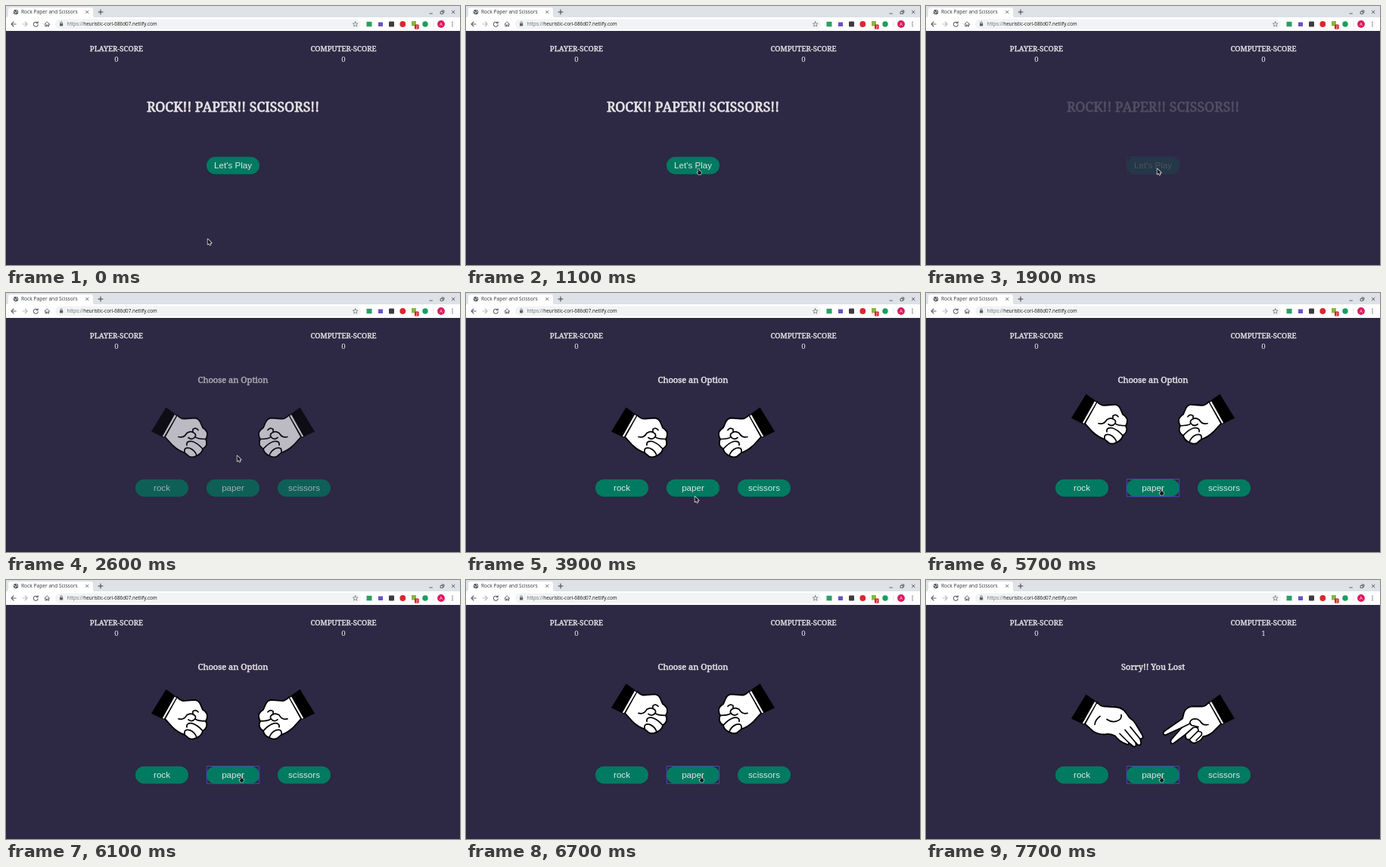
Animation of 600 by 343 pixels, one loop 8000 ms. Source, as an HTML page with a canvas:

```html
<!DOCTYPE html>
<html lang="en">
<head>
<meta charset="utf-8">
<title>Rock Paper and Scissors</title>
<style>
html, body { margin: 0; width: 100%; height: 100%; overflow: hidden; background: #2d2843; }
canvas { display: block; width: 600px; height: 343px; }
</style>
</head>
<body>
<canvas id="stage" width="600" height="343"></canvas>
<script>
const screen2d = document.getElementById('stage').getContext('2d');
const layer = document.createElement('canvas');
layer.width = 600;
layer.height = 343;
const layer2d = layer.getContext('2d');
let ctx = screen2d;

const LOOP = 8000;
const BG = '#2d2843', TEAL = '#007a61', INK = '#e4e2e5', GREY = '#5f6368';
const SERIF = '"Noto Serif", serif';
const SANS = '"Noto Sans", sans-serif';
const ARIAL = '"Liberation Sans", Arial, sans-serif';

const clamp = v => Math.max(0, Math.min(1, v));
const progress = (t, start, length) => clamp((t - start) / length);

// CSS "ease": cubic-bezier(.25, .1, .25, 1)
function ease(x) {
  if (x <= 0 || x >= 1) return clamp(x);
  const curve = (a, b, s) => 3 * a * s * (1 - s) ** 2 + 3 * b * s * s * (1 - s) + s ** 3;
  let lo = 0, hi = 1;
  for (let i = 0; i < 24; i++) {
    const mid = (lo + hi) / 2;
    if (curve(.25, .25, mid) < x) lo = mid; else hi = mid;
  }
  return curve(.1, 1, lo);
}

// Paints a group on its own layer, then blends it in as one.
function fade(opacity, paint) {
  if (opacity <= 0) return;
  layer2d.clearRect(0, 0, 600, 343);
  ctx = layer2d;
  paint();
  ctx = screen2d;
  ctx.globalAlpha = opacity;
  ctx.drawImage(layer, 0, 0);
  ctx.globalAlpha = 1;
}

function text(str, x, y, font, color = INK, align = 'center', weight = 0) {
  ctx.font = font;
  ctx.textAlign = align;
  ctx.fillStyle = color;
  ctx.fillText(str, x, y);
  if (weight) {
    ctx.strokeStyle = color;
    ctx.lineWidth = weight;
    ctx.lineJoin = 'round';
    ctx.strokeText(str, x, y);
  }
}

function pill(x, y, w, h, r, color) {
  ctx.fillStyle = color;
  ctx.beginPath();
  ctx.roundRect(x, y, w, h, r);
  ctx.fill();
}

function dot(x, y, r, color) {
  ctx.fillStyle = color;
  ctx.beginPath();
  ctx.arc(x, y, r, 0, 7);
  ctx.fill();
}

function line(d, color, width = 1) {
  ctx.strokeStyle = color;
  ctx.lineWidth = width;
  ctx.lineJoin = ctx.lineCap = 'round';
  ctx.stroke(new Path2D(d));
}

function shape(d, color) {
  ctx.fillStyle = color;
  ctx.fill(new Path2D(d));
}

// ---- browser frame ----
function browser() {
  pill(0, 0, 600, 16, 0, '#dee1e6');
  pill(0, 15, 600, 18, 0, '#fff');
  shape('M0 15.5 Q3 15 3 12 V5 Q3 2 6 2 H112 Q115 2 115 5 V12 Q115 15 118 15.5 Z', '#fff');

  dot(13, 8, 3.2, '#4d5156');
  line('M10.7 7 L12.5 8 L12 10 M13.5 5.5 L15 7.2 L14 9', '#fff', .9);
  text('Rock Paper and Scissors', 20, 10.3, '6.6px ' + SANS, '#3c4043', 'left');
  line('M105.6 6.2 l3.4 3.4 M109 6.2 l-3.4 3.4', GREY, .9);
  line('M122 8 h6 M125 5 v6', '#3c4043', 1);
  line('M560 10 h3.4 M574.5 7.4 h3 v3 h-3 z M575.8 6 h3 v3 M589.4 6.2 l3.6 3.6 M593 6.2 l-3.6 3.6', '#3c4043', .8);

  line('M13.2 24 H7.2 M10 21 L7 24 L10 27', GREY, 1.1);
  line('M22 24 H28 M25.2 21 L28.2 24 L25.2 27', '#babcbe', 1.1);
  line('M41.7 22.4 A3 3 0 1 0 42.3 24.8 M42.2 20.8 V22.8 H40', GREY, 1.1);
  line('M51 24.2 L54.3 21 L57.6 24.2 M52 23.6 V27 H53.6 V25 H55 V27 H56.6 V23.6', GREY, 1);

  pill(65, 17.5, 404, 13, 6.5, '#f1f3f4');
  pill(71, 23, 4.2, 3.6, .6, GREY);
  line('M71.9 23 V22 A1.2 1.2 0 0 1 74.3 22 V23', GREY, .8);
  const url = '6.35px ' + SANS;
  text('https://', 80.5, 26.2, url, '#70757a', 'left');
  const host = 80.5 + ctx.measureText('https://').width;
  text('heuristic-cori-686d07.netlify.com', host, 26.2, url, '#202124', 'left');

  let star = '';
  for (let i = 0; i < 10; i++) {
    const a = i * Math.PI / 5 - Math.PI / 2, r = i % 2 ? 1.6 : 3.5;
    star += (i ? 'L' : 'M') + (461.7 + r * Math.cos(a)) + ' ' + (24.2 + r * Math.sin(a));
  }
  line(star + 'Z', GREY, .7);

  pill(476.5, 20.8, 7, 6.5, 0, '#2b9f63');
  pill(492, 21.5, 6, 5.5, 0, '#6a4fc4');
  pill(506, 20.6, 7, 7, 1, '#3c3c40');
  dot(524.3, 24, 3.9, '#dc2530');
  pill(536, 20, 6, 6.5, 0, '#87b83f');
  pill(540, 24.5, 5.6, 6.2, 1, '#d5202a');
  text('2', 542.8, 29.6, '5px ' + ARIAL, '#fff');
  dot(554, 24, 3.7, '#16a05c');
  line('M565 20.5 V27.5', '#d5d7da', .7);
  dot(575, 24, 4.9, '#e0195f');
  text('A', 575, 25.9, '5.3px ' + ARIAL, '#fff');
  for (const y of [21.5, 24, 26.5]) dot(590, y, .8, GREY);
}

// ---- page parts ----
function scores(computer) {
  const label = '9.7px ' + SERIF, digit = '9.7px ' + SERIF;
  text('PLAYER-SCORE', 146, 59.8, label, INK, 'center', .4);
  text('COMPUTER-SCORE', 446, 59.8, label, INK, 'center', .4);
  text('0', 146, 74.3, digit);
  text(computer, 446, 74.3, digit);
}

function button(label, x, y, focused) {
  pill(x, y, 70, 23, 11.5, TEAL);
  text(label, x + 35, y + 15.4, '11.6px ' + ARIAL, '#dfe5e4');
  if (focused) {
    ctx.strokeStyle = '#4549b4';
    ctx.lineWidth = 1;
    ctx.strokeRect(x + .3, y - .2, 69.4, 23.2);
  }
}

// Each pose is a left-hand outline plus inner creases.
const POSES = {
  rock: [
    'M226 161 Q231 167 237 166 L250 165 Q255 166 257 171 L260 178 Q266 182 266 186 Q266 190 264 193 Q268 201 260 206 Q259 212 252 215 Q247 218 242 216 L236 211 Q227 208 220 201 L210 190 Z',
    'M228 190 Q235 192 239 185 Q244 182 247 184 L247 180 Q251 177 254 181 M247 184 Q252 186 250 190 Q253 193 264 193 M250 190 Q246 195 241 191 M260 206 Q253 198 246 196 Q238 195 239 201 M252 215 Q250 208 243 205 Q235 203 236 210'
  ],
  paper: [
    'M226 161 Q231 168 238 167 L252 168 Q260 169 264 175 L269 182 Q274 185 277 190 L286 205 Q288 210 283 210 L284 214 Q285 219 280 218 L277 215 Q279 221 274 220 L268 215 Q268 219 263 216 Q255 213 250 206 Q243 202 236 204 Q228 204 221 200 L210 190 Z',
    'M283 210 L270 194 M278 216 L263 198 M268 215 L256 203 M223 191 Q224 184 230 180 M239 184 Q246 189 253 186 Q259 184 258 178'
  ],
  scissors: [
    'M226 161 Q231 168 237 167 L249 167 Q257 169 259 175 L261 183 L284 199 Q289 203 284 205 L262 195 L276 211 Q278 217 273 216 L257 204 Q258 211 252 211 Q247 218 242 214 Q236 212 234 207 Q227 206 221 201 L210 190 Z',
    'M227 191 Q234 193 238 186 Q242 182 248 184 Q254 188 249 192 L240 194 M262 195 L252 190 M257 204 L247 195 Q240 193 240 199 L252 211 M240 200 Q234 200 236 205 L243 212'
  ]
};

function hand(pose, lift, mirrored) {
  const [outline, creases] = POSES[pose];
  ctx.save();
  if (mirrored) ctx.transform(-1, 0, 0, 1, 600, 0);
  ctx.translate(0, .5 - lift);
  shape(outline, '#fff');
  line(outline, '#000', 1.8);
  line(creases, '#000', 1.7);
  const band = 'M222.5 160 L225.5 162 L209 190.5 L206 189.5 Z';
  shape(band, '#fff');
  line(band, '#000', 1);
  shape('M211.5 151 L223.5 159.5 L206.5 190 L192 183 Z', '#000');
  ctx.restore();
}

function intro(t) {
  fade(1 - ease(progress(t, 1650, 500)), () => {
    text('ROCK!! PAPER!! SCISSORS!!', 300, 140, '17.7px ' + SERIF, INK, 'center', .8);
    button("Let's Play", 265, 199.7, t >= 1500);
  });
}

// Four shakes, eased between the low and high ends.
const BEATS = [0, .15, .25, .35, .47, .62, .765, .86, 1];
function shake(t) {
  const p = progress(t, 5100, 2000);
  if (p <= 0 || p >= 1) return 0;
  const i = BEATS.findIndex(b => b > p) - 1;
  const e = ease((p - BEATS[i]) / (BEATS[i + 1] - BEATS[i]));
  return 22 * (i % 2 ? 1 - e : e);
}

function match(t) {
  const heading = t < 7200 ? 'Choose an Option' : 'Sorry!! You Lost';
  const lift = shake(t);
  fade(ease(progress(t, 2200, 1000)), () => {
    text(heading, 300, 118.8, '11.1px ' + SERIF, INK, 'center', .5);
    hand(t < 7600 ? 'rock' : 'paper', lift, false);
    hand(t < 7700 ? 'rock' : 'scissors', lift, true);
    button('rock', 171, 246.7);
    button('paper', 265, 246.7, t >= 5000);
    button('scissors', 359, 246.7);
  });
}

// ---- pointer: [time, x, y] ----
const TRACK = [
  [400, 266, 308], [600, 272, 289], [800, 288, 246], [1000, 302, 219], [1100, 305, 215],
  [3100, 305, 215], [3300, 262, 188], [3400, 241, 178], [3500, 306, 167], [3600, 374, 190],
  [3700, 362, 232], [3800, 322, 262], [3900, 302, 269],
  [4400, 302, 269], [4700, 308, 259.5]
];

function pointer(t) {
  let i = TRACK.findIndex(k => k[0] > t);
  if (i < 0) i = TRACK.length;
  const a = TRACK[Math.max(0, i - 1)], b = TRACK[Math.min(i, TRACK.length - 1)];
  const p = b[0] > a[0] ? progress(t, a[0], b[0] - a[0]) : 0;
  const x = a[1] + (b[1] - a[1]) * p, y = a[2] + (b[2] - a[2]) * p;
  const overButton = (t >= 1000 && t < 1700) || t >= 4500;
  const form = overButton
    ? 'M2 .4 Q3 0 3.2 1 V3.3 L5.6 4 Q6.2 4.5 6 6 L5.4 8.2 H2.2 L.4 5.6 Q.3 4.6 1.6 5.4 V1 Z'
    : 'M.5 .5 V7.8 L2.2 6.3 L3.4 8.8 L4.6 8.2 L3.5 5.8 H5.8 Z';
  ctx.save();
  ctx.translate(x, y);
  line(form, '#f2f2f2', overButton ? 1.1 : 1.4);
  shape(form, '#17151c');
  ctx.restore();
}

function draw(t) {
  pill(0, 0, 600, 343, 0, BG);
  browser();
  scores(t < 7200 ? '0' : '1');
  if (t < 2200) intro(t); else match(t);
  pointer(t);
}

const begin = performance.now();
function frame() {
  draw((performance.now() - begin) % LOOP);
  requestAnimationFrame(frame);
}
frame();
</script>
</body>
</html>
```
